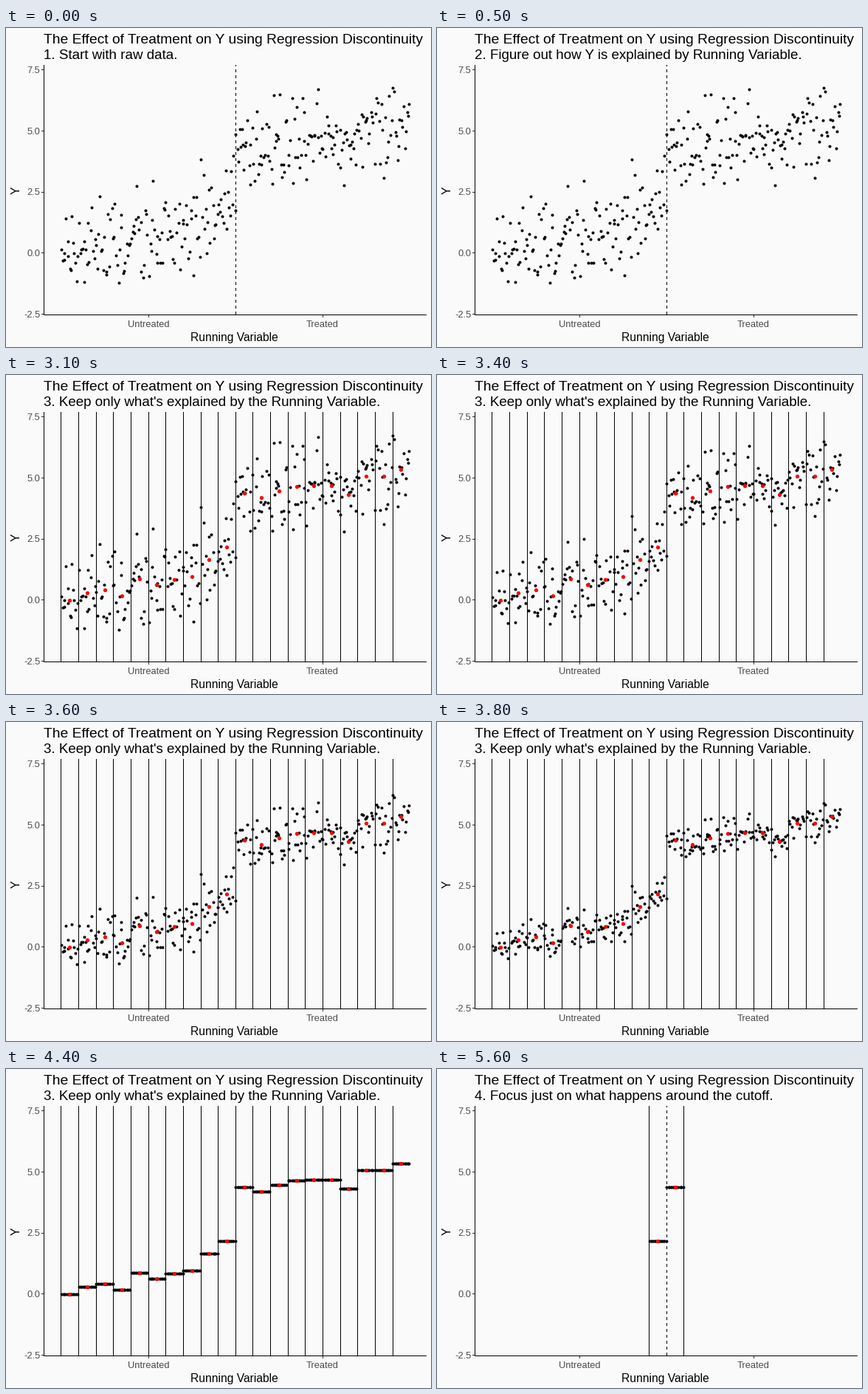
These frames come from a looping animation (576x432 px, 8000 ms). A matplotlib script:

```python
import math

import numpy as np
import matplotlib.pyplot as plt
from matplotlib.animation import FuncAnimation

W, H, DPI = 576, 432, 72
STEP_MS, FRAMES = 100, 80
LEFT, RIGHT, TOP, BOTTOM = 51, 570, 50, 388
BIN_START, BIN_WIDTH, BIN_COUNT = 74.4, 23.64, 20
CUTOFF_BIN, POINT_COUNT = 10, 300

# Average of Y inside each bin
BIN_MEANS = np.array([0.0, 0.3, 0.4, 0.17, 0.86, 0.61, 0.82, 0.95, 1.64, 2.15,
                      4.36, 4.18, 4.45, 4.63, 4.66, 4.66, 4.3, 5.05, 5.05, 5.33])

SUBTITLES = [
    (0, "1. Start with raw data."),
    (500, "2. Figure out how Y is explained by Running Variable."),
    (3100, "3. Keep only what's explained by the Running Variable."),
    (5600, "4. Focus just on what happens around the cutoff."),
]
BINS_AT, COLLAPSE_AT, COLLAPSE_MS, FOCUS_AT = 1000, 3000, 1400, 5600

plt.rcParams["font.family"] = "Liberation Sans"


def y_pixel(value):
    return 304.5 - 33.1 * value


def bin_edge(i):
    return round(BIN_START + BIN_WIDTH * i)


def make_points():
    """Evenly scattered x, with noise around each bin's average."""
    rng = np.random.default_rng(7)
    spread = (np.arange(POINT_COUNT) + rng.random(POINT_COUNT)) / POINT_COUNT
    bins = (spread * BIN_COUNT).astype(int)
    noise = np.clip(rng.normal(0, 0.98, POINT_COUNT), -2.1, 2.2)
    for i in range(BIN_COUNT):
        noise[bins == i] -= noise[bins == i].mean()
    return BIN_START + BIN_WIDTH * BIN_COUNT * spread, noise, bins


px, noise, bins = make_points()
near_points = (bins == CUTOFF_BIN - 1) | (bins == CUTOFF_BIN)
mean_x = BIN_START + BIN_WIDTH * (np.arange(BIN_COUNT) + 0.5)

fig = plt.figure(figsize=(W / DPI, H / DPI), dpi=DPI, facecolor="#fafafa")
ax = fig.add_axes([0, 0, 1, 1])
ax.set_xlim(0, W)
ax.set_ylim(H, 0)
ax.axis("off")


def line(x, y, color="black", **style):
    return ax.plot(x, y, color=color, lw=1, snap=False,
                   solid_capstyle="butt", dash_capstyle="butt", **style)[0]


def vline(column, start=BOTTOM, end=TOP, color="black", **style):
    return line([column + 0.5] * 2, [start, end], color, **style)


def hline(row, start, end, color="black"):
    return line([start, end], [row + 0.5] * 2, color)


def label(x, y, text, size, color="black", **style):
    style.setdefault("va", "baseline")
    return ax.text(x, y, text, fontsize=size, color=color, **style)


def dots(size, color, z):
    return ax.scatter([], [], s=size ** 2, c=color, linewidths=0, zorder=z)


# Axes, ticks and titles
vline(LEFT)
hline(BOTTOM, LEFT, RIGHT)
for value in np.arange(-2.5, 7.6, 2.5):
    y = y_pixel(value)
    hline(round(y), LEFT - 3, LEFT, "#333333")
    label(46.2, y + 4.6, f"{value:.1f}".replace("\u2212", "-"), 12.9, "#4d4d4d",
          ha="right")
for column, name in ((193, "Untreated"), (429, "Treated")):
    vline(column, BOTTOM + 1, BOTTOM + 4, "#333333")
    label(column, 405, name, 12.9, "#4d4d4d", ha="center")
label(309.6, 424, "Running Variable", 15.6, ha="center")
label(14.5, 220, "Y", 15.6, ha="center", va="center", rotation=90)
label(50.7, 21, "The Effect of Treatment on Y using Regression Discontinuity", 19.2)
subtitle = label(50.7, 42, "", 18.8)

cutoff = vline(bin_edge(CUTOFF_BIN), dashes=(4, 4))
edges = [vline(bin_edge(i)) for i in range(BIN_COUNT)]
points = dots(4, "black", 6)
averages = dots(5.3, "red", 7)


def update(frame):
    t = frame * STEP_MS
    focused = t >= FOCUS_AT
    binned = BINS_AT <= t < FOCUS_AT

    subtitle.set_text([text for start, text in SUBTITLES if t >= start][-1])
    cutoff.set_visible(not binned)
    for i, edge in enumerate(edges):
        edge.set_visible(binned or focused and abs(i - CUTOFF_BIN) == 1)

    u = min(max((t - COLLAPSE_AT) / COLLAPSE_MS, 0), 1)
    remaining = (1 + math.cos(math.pi * u)) / 2
    y = y_pixel(BIN_MEANS[bins] + noise * remaining)
    keep = near_points if focused else slice(None)
    points.set_offsets(np.column_stack([px, y])[keep])

    shown = slice(CUTOFF_BIN - 1, CUTOFF_BIN + 1) if focused else slice(None)
    averages.set_offsets(np.column_stack([mean_x, y_pixel(BIN_MEANS)])[shown])
    averages.set_visible(binned or focused)
    return [subtitle, cutoff, *edges, points, averages]


anim = FuncAnimation(fig, update, frames=FRAMES, interval=STEP_MS,
                     repeat=True, repeat_delay=0, blit=False)
plt.show()
```
